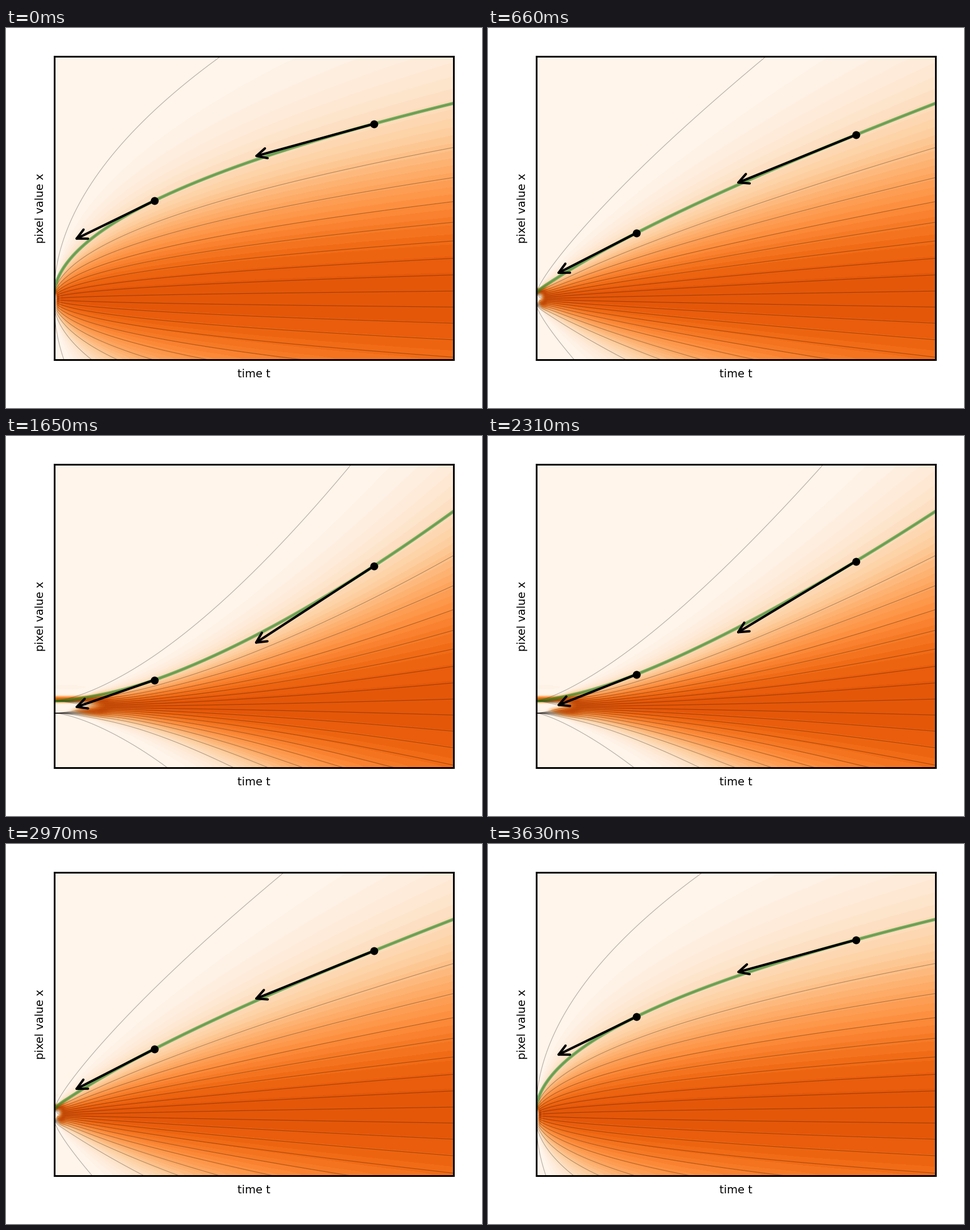
Write a matplotlib script that moves like this. It is 837 px wide and 669 px high and loops after 3960 ms.

```python
import math

import numpy as np
import matplotlib
import matplotlib.pyplot as plt
from matplotlib.animation import FuncAnimation
from matplotlib.patches import FancyArrowPatch

W, H, DPI = 837, 669, 100
LEFT, RIGHT, TOP, BOTTOM = 85, 787, 50, 584
FRAMES, INTERVAL = 12, 330
SIGMA_MAX, SIGMA_MIN = 20.0, 0.02
Y_MIN, Y_MAX = -10, 40
ARROWS = [(0.25, 0.2), (0.8, 0.3)]  # start time, step back in time


def probit(q):
    """Standard normal quantile by bisection."""
    lo, hi = -5.0, 5.0
    for _ in range(50):
        mid = (lo + hi) / 2
        if 0.5 * (1 + math.erf(mid / math.sqrt(2))) < q:
            lo = mid
        else:
            hi = mid
    return lo


def flow(x, log_sigma):
    """dx / d(log sigma) for two point masses at -1 and 1."""
    return x - np.tanh(x / math.exp(2 * log_sigma))


def solve_paths(count=20, steps=1500):
    """Follow evenly spread quantiles from the largest noise level down."""
    logs = np.linspace(math.log(SIGMA_MAX), math.log(SIGMA_MIN), steps)
    h = logs[1] - logs[0]
    z = np.array([probit(q) for q in np.linspace(0.001, 0.999, count)])
    x = z * math.sqrt(SIGMA_MAX ** 2 + 1)
    out = [x]
    for s in logs[:-1]:
        k1 = flow(x, s)
        k2 = flow(x + h / 2 * k1, s + h / 2)
        k3 = flow(x + h / 2 * k2, s + h / 2)
        k4 = flow(x + h * k3, s + h)
        x = x + h / 6 * (k1 + 2 * k2 + 2 * k3 + k4)
        out.append(x)
    return logs[::-1], np.array(out)[::-1].T


def noise(t, power):
    return np.maximum(SIGMA_MAX * np.asarray(t) ** power, SIGMA_MIN)


def density(power):
    """Noisy density on a coarse grid, each column scaled to a peak of 1."""
    sigma = noise(grid_t, power)[None, :]
    x = grid_x[:, None]
    p = sum(np.exp(-0.5 * ((x - m) / sigma) ** 2) for m in (-1, 1))
    return p / p.max(axis=0)


log_sigmas, paths = solve_paths()
grid_t = np.linspace(0, 1, 200)
grid_x = np.linspace(Y_MIN, Y_MAX, 60)
line_t = np.linspace(0, 1, 400) ** 2

# The small margin keeps the pixel size from rounding down.
fig = plt.figure(figsize=((W + 0.01) / DPI, (H + 0.01) / DPI), dpi=DPI,
                 facecolor="white")
ax = fig.add_axes([LEFT / W, 1 - BOTTOM / H,
                   (RIGHT - LEFT) / W, (BOTTOM - TOP) / H])
image = ax.imshow(density(0.5), origin="lower", aspect="auto",
                  extent=(0, 1, Y_MIN, Y_MAX), interpolation="lanczos",
                  cmap=matplotlib.colormaps["Oranges"].resampled(40),
                  vmin=0, vmax=1.45)
ax.set(xlim=(0, 1), ylim=(Y_MIN, Y_MAX), xticks=[], yticks=[])
for spine in ax.spines.values():
    spine.set_linewidth(2.2)
    spine.set_zorder(6)

lines = [ax.plot([], [], color="black", lw=0.8, alpha=0.3)[0] for _ in paths]
green, = ax.plot([], [], color="forestgreen", lw=4, alpha=0.6, zorder=3)
dots, = ax.plot([], [], "o", color="black", ms=10, mew=0, zorder=5)
arrows = [FancyArrowPatch((0, 0), (1, 1), arrowstyle="->", color="black",
                          lw=3, mutation_scale=32, shrinkA=0, shrinkB=0,
                          zorder=4) for _ in ARROWS]
for arrow in arrows:
    ax.add_patch(arrow)

label = dict(fontsize=14, family="DejaVu Sans", ha="center", va="baseline",
             rotation_mode="anchor")
fig.text((LEFT + RIGHT) / 2 / W, 1 - 615 / H, "time t", **label)
fig.text(65.5 / W, 1 - (TOP + BOTTOM) / 2 / H, "pixel value x",
         rotation=90, **label)


def update(i):
    power = 1 - 0.5 * math.cos(2 * math.pi * i / (FRAMES - 1))
    image.set_data(density(power))

    logs = np.log(noise(line_t, power))
    for line, path in zip(lines, paths):
        line.set_data(line_t, np.interp(logs, log_sigmas, path))
    main = paths[-2]
    green.set_data(line_t, np.interp(logs, log_sigmas, main))

    starts = []
    for arrow, (t, step) in zip(arrows, ARROWS):
        s = math.log(noise(t, power))
        x = float(np.interp(s, log_sigmas, main))
        slope = power / t * float(flow(x, s))
        arrow.set_positions((t, x), (t - step, x - step * slope))
        starts.append((t, x))
    dots.set_data(*zip(*starts))
    return [image, *lines, green, *arrows, dots]


anim = FuncAnimation(fig, update, frames=FRAMES, interval=INTERVAL,
                     repeat=True, repeat_delay=0, blit=False)
plt.show()
```
